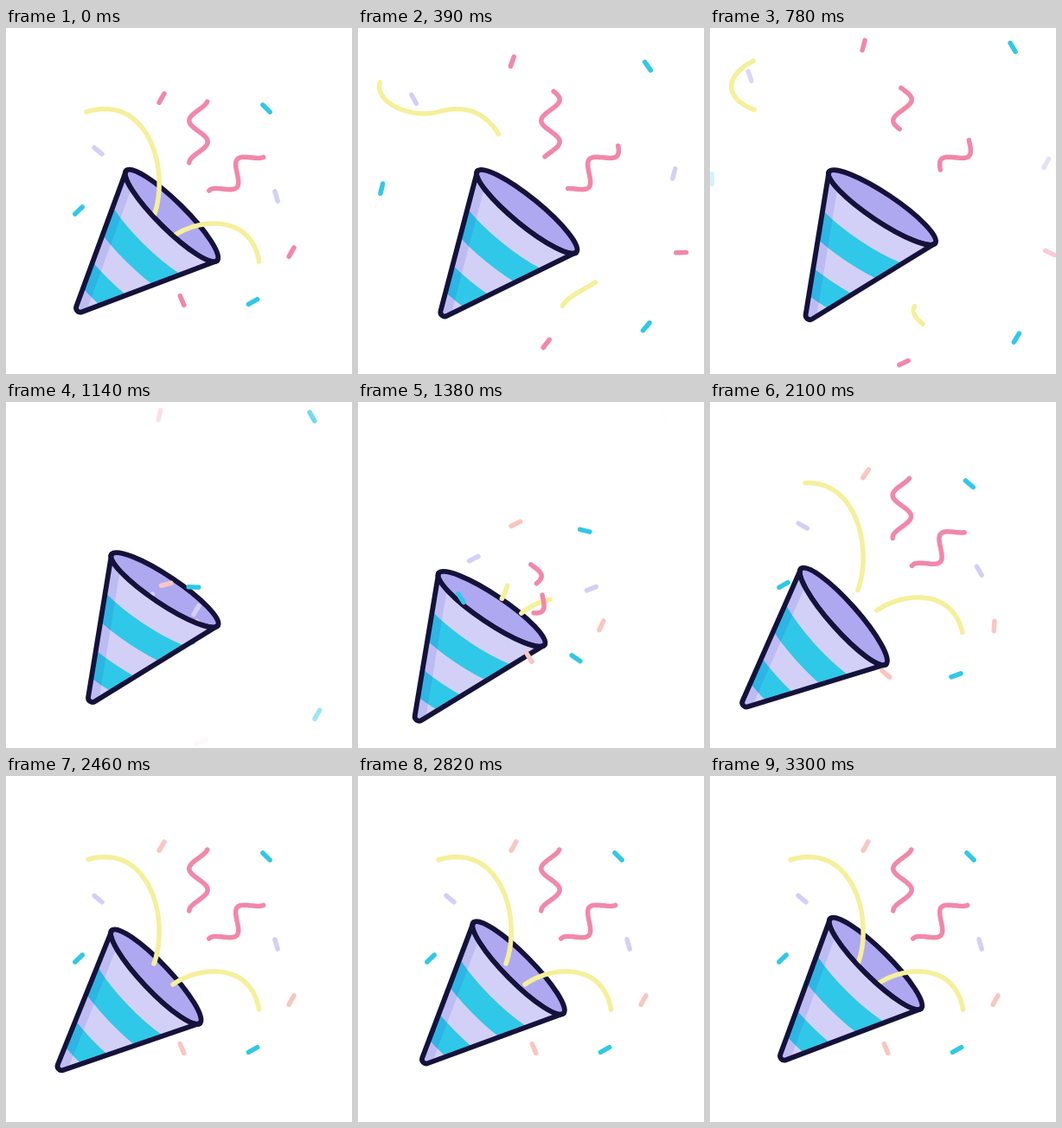
An HTML page with a canvas that plays this animation: 400 by 400 pixels, repeating every 3330 ms.

```html
<!DOCTYPE html>
<html lang="en">
<head>
<meta charset="utf-8">
<title>Party popper</title>
<style>
  html, body { margin: 0; width: 100%; height: 100%; overflow: hidden; background: #fff; }
  canvas { display: block; width: 100vw; height: 100vh; }
</style>
</head>
<body>
<canvas id="stage" width="400" height="400"></canvas>
<script>
const ctx = document.getElementById('stage').getContext('2d');
const LOOP = 3330, STEP = 30, BURST = 1140, EMERGED = 1320;
const INK = '#14123a', CYAN = '#30c8e8', LAVENDER = '#d3d0f8', MOUTH = '#aea8f0';
const PINK = '#f287a9', BLUSH = '#f9c6c0', YELLOW = '#f5f09a';
const LINE = 5.5, INK_LINE = 5.8;

const mix = (a, b, k) => a + (b - a) * k;
const progress = (t, from, to) => Math.max(0, Math.min(1, (t - from) / (to - from)));
const easeOut = (u, power) => 1 - (1 - u) ** power;
const smooth = u => u * u * (3 - 2 * u);
const radians = degrees => degrees * Math.PI / 180;

// Share of a motion still to go; 1 shortly after the burst, 0 at `end`.
const settle = (t, end, power) => (Math.max(0, end - t) / (end - 1380)) ** power;
const travelLeft = t => settle(t, 2813, 5);
const spinLeft = t => settle(t, 2372, 1.5);
const unrollLeft = t => settle(t, 2950, 4);

// ---- Cone: tilt up, kick back, return slowly ----
const RADIUS = 74, DEPTH = 16, HEIGHT = 162;
const REST = { x: 191.5, y: 217, angle: 44.7 };
const TILTED = { x: 199, y: 207.5, angle: 33.8 };
const KICKED = { x: 138, y: 261.5, angle: 50 };

function conePose(t) {
  const tilt = smooth(progress(t, 0, 780));
  const back = easeOut(progress(t, 1860, 3300), 2);
  const kick = progress(t, 1050, 1860);
  const part = (key, k) =>
    mix(mix(mix(REST[key], TILTED[key], tilt), KICKED[key], k), REST[key], back);
  return {
    x: part('x', easeOut(kick, 2.5)),
    y: part('y', easeOut(kick, 1.7)),
    angle: part('angle', smooth(progress(t, 1350, 1830)))
  };
}

function inConeSpace(t, draw) {
  const { x, y, angle } = conePose(t);
  ctx.save();
  ctx.translate(x, y);
  ctx.rotate(radians(angle));
  draw();
  ctx.restore();
}

function fill(color) {
  ctx.fillStyle = color;
  ctx.fill();
}

function stroke(color, width = LINE) {
  ctx.strokeStyle = color;
  ctx.lineWidth = width;
  ctx.stroke();
}

function drawMouth() {
  ctx.beginPath();
  ctx.ellipse(0, 0, RADIUS, DEPTH, 0, 0, Math.PI * 2);
  fill(MOUTH);
  stroke(INK, INK_LINE);
}

function bodyPath() {
  ctx.beginPath();
  ctx.ellipse(0, 0, RADIUS, DEPTH, 0, 0, Math.PI);
  ctx.arcTo(0, HEIGHT, RADIUS, 0, 5);
  ctx.closePath();
}

// A stripe lies between two shifted copies of the lip.
function stripe(top, thickness) {
  ctx.beginPath();
  ctx.ellipse(0, top, RADIUS, DEPTH, 0, 0, Math.PI);
  ctx.ellipse(0, top + thickness, RADIUS, DEPTH, 0, Math.PI, 0, true);
  fill(CYAN);
}

function drawBody() {
  bodyPath();
  fill(LAVENDER);
  ctx.save();
  ctx.clip();
  stripe(30, 28.7);
  stripe(87.5, 28.7);
  ctx.beginPath();
  ctx.moveTo(-RADIUS, 0);
  ctx.lineTo(-60, 0);
  ctx.lineTo(14, HEIGHT);
  ctx.lineTo(0, HEIGHT);
  fill('rgba(30,40,200,0.12)');
  ctx.restore();
  bodyPath();
  stroke(INK, INK_LINE);
}

// ---- Streamers: a window sliding along a curve ----
function bezier(u, ...p) {
  const v = 1 - u;
  return [0, 1].map(k =>
    v ** 3 * p[0][k] + 3 * v * v * u * p[1][k] + 3 * v * u * u * p[2][k] + u ** 3 * p[3][k]);
}

const curl = (start, a, b, bend, c, d, end) => u =>
  u < 1 ? bezier(u, start, a, b, bend) : bezier(u - 1, bend, c, d, end);

// One unit of u is half a wave.
const wave = (x, y, degrees) => u => {
  const along = (u - 2) * 24.4, side = 10.7 * Math.cos(Math.PI * u);
  const cos = Math.cos(radians(degrees)), sin = Math.sin(radians(degrees));
  return [x + along * cos - side * sin, y + along * sin + side * cos];
};

// `rest` and `early` are [tail, head] windows; `end` is where the streamer vanishes.
const ribbon = { color: YELLOW, rest: [0, 1], end: 2, shift: 0 };
const squiggle = {
  color: PINK, rest: [1, 3.9], early: [-0.35, 0.55], end: 4.55, shift: 21,
  tailPower: 2.45, headLeft: travelLeft
};
const streamers = [
  { ...ribbon, early: [-0.07, 0.03], tailPower: 1.28, headLeft: unrollLeft,
    path: curl([171, 217], [190, 165], [165, 75], [93, 97], [50, 108], [-10, 71], [50, 38]) },
  { ...ribbon, early: [-0.05, 0.27], tailPower: 0.41, headLeft: travelLeft,
    path: curl([193, 241], [222, 220], [283, 214], [292.5, 270], [296, 300], [205, 310], [246, 342]) },
  { ...squiggle, path: wave(222.5, 131.5, -90) },
  { ...squiggle, path: wave(259, 177, -48) }
];

function drawStreamer({ color, path, rest, early, end, shift, tailPower, headLeft }, t) {
  const bursting = t >= BURST;
  const tail = bursting
    ? mix(rest[0], early[0], travelLeft(t))
    : mix(rest[0], end, progress(t, 0, 1080) ** tailPower);
  const head = bursting
    ? mix(rest[1], early[1], headLeft(t))
    : mix(rest[1], end, easeOut(progress(t, 0, 780), 2));
  if (head - tail < 0.01) return;
  const offset = bursting ? shift * travelLeft(t) : 0;
  ctx.beginPath();
  for (let i = 0; i <= 60; i++) {
    const [x, y] = path(mix(tail, head, i / 60));
    ctx.lineTo(x - offset, y + offset);
  }
  stroke(color);
}

// ---- Confetti: thrown outwards from one centre ----
const CENTRE = { x: 187, y: 257 };
const confetto = (color, x, y, angle, fling, spin) => ({ color, x, y, angle, fling, spin });

// Listed in the order in which they fade.
const confetti = [
  confetto(CYAN, 84, 211, -44, 97, 101),
  confetto(PINK, 330, 259, 120, 68, -185),
  confetto(LAVENDER, 312.5, 194.5, 74, 92, -96),
  confetto(LAVENDER, 106.5, 142, 40, 114, -67),
  confetto(PINK, 203.5, 315, 67, 81, -189),
  confetto(PINK, 180, 81, -60, 66, 33),
  confetto(CYAN, 285.5, 316.5, -29, 87, 64),
  confetto(CYAN, 301, 93, 45, 93, -31)
];

function drawConfetto({ color, x, y, angle, fling, spin }, index, t, bursting) {
  const dx = x - CENTRE.x, dy = y - CENTRE.y;
  const flight = easeOut(progress(t, 0, 1350), 3);
  const fadeStart = 500 + 75 * index;
  const reach = bursting ? -0.34 * travelLeft(t) : fling * flight / Math.hypot(dx, dy);
  const turn = bursting ? spin * spinLeft(t) : -spin * flight / 2;
  ctx.save();
  if (!bursting) ctx.globalAlpha = 1 - progress(t, fadeStart, fadeStart + 360);
  ctx.translate(x + dx * reach, y + dy * reach);
  ctx.rotate(radians(angle + turn));
  ctx.beginPath();
  ctx.moveTo(-5.8, 0);
  ctx.lineTo(5.8, 0);
  stroke(bursting && color === PINK ? BLUSH : color);
  ctx.restore();
}

function render(t) {
  const scatter = bursting => confetti.forEach((c, i) => drawConfetto(c, i, t, bursting));
  ctx.clearRect(0, 0, 400, 400);
  ctx.lineCap = ctx.lineJoin = 'round';
  inConeSpace(t, drawMouth);
  if (t >= BURST && t < EMERGED) scatter(true);
  streamers.forEach(s => drawStreamer(s, t));
  inConeSpace(t, drawBody);
  if (t < 1400) scatter(false);
  if (t >= EMERGED) scatter(true);
}

const began = performance.now();
function tick() {
  const t = (performance.now() - began) % LOOP;
  render(Math.floor(t / STEP) * STEP);
  requestAnimationFrame(tick);
}
tick();
</script>
</body>
</html>
```
